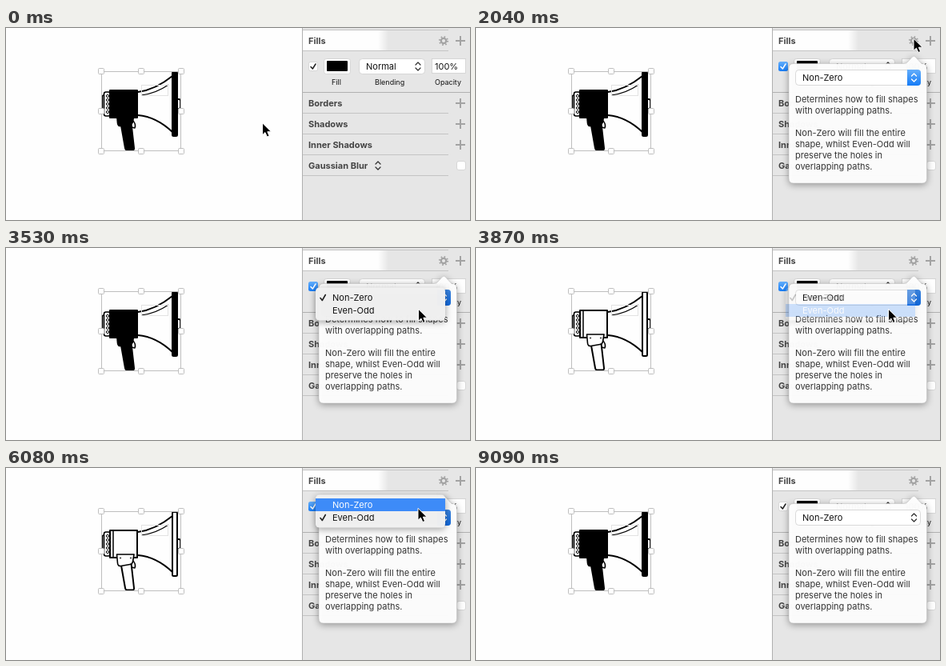
Recreate the animation shown at these times as an HTML page. Size 580 by 240 pixels, loop 9190 ms.

```html
<!DOCTYPE html>
<html lang="en">
<head>
<meta charset="utf-8">
<title>Fill rule popover</title>
<style>
html, body { margin: 0; width: 100%; height: 100%; overflow: hidden; background: #fefefe; }
svg { display: block; width: 100%; height: 100%; }
text { font: 11px Inter, "Open Sans", sans-serif; fill: #111; white-space: pre; }
.head { font-weight: 700; fill: #444; }
.small { font-size: 9px; }
.note { fill: #333; }
.line { fill: none; stroke: #c4c4c4; }
.edge { fill: none; stroke: #b0b0b0; }
.field { fill: #fff; stroke: #cbcbcb; stroke-width: .7; }
.icon { fill: none; stroke: #a3a3a3; stroke-width: 2; }
.arrows { fill: none; stroke: #333; stroke-width: 1.3; stroke-linecap: round; stroke-linejoin: round; }
.ink { fill: none; stroke: #000; stroke-width: 2; stroke-linejoin: round; }
.thin { stroke-width: 1.2; }
.shade { filter: drop-shadow(0 2px 4px rgba(0,0,0,.36)); }
</style>
</head>
<body>
<svg viewBox="0 0 580 240" id="stage">
  <defs>
    <linearGradient id="rowFade" gradientUnits="userSpaceOnUse" x1="465" x2="478" y1="0" y2="0">
      <stop stop-color="#fefefe"/><stop offset="1" stop-color="#e6e6e6"/>
    </linearGradient>
    <linearGradient id="blue" x2="0" y2="1">
      <stop stop-color="#64aefb"/><stop offset="1" stop-color="#167cf6"/>
    </linearGradient>
  </defs>

  <g id="megaphone" class="ink">
    <path d="M123 84 h-1 q-1.5 0-1.5 2 v15 q0 2 1.5 2 h1" stroke-width="1.6"/>
    <rect x="122.5" y="80" width="8" height="30" rx="2.5" stroke-width="1.6"/>
    <g id="knobs" stroke-width="1"></g>
    <path d="M165 80 Q187 77 208 60 M165 109 Q188 111 208 130"/>
    <path class="thin" d="M169 84 Q187 82 203 71"/>
    <path d="M215 89 h1 q2 0 2 2 v8 q0 2-2 2 h-1" stroke-width="1.8"/>
    <path d="M158 115 q5 5 3 10 l-4-1" stroke-width="1.5"/>
    <rect class="solid" x="130" y="78" width="34" height="34"/>
    <path d="M134 78 V112" stroke-width="1.5"/>
    <path class="solid" d="M143.5 119 L149 150 Q149.3 152.5 151.5 152.5 H158 Q160.3 152.5 160 150 L156.5 119 Z"/>
    <path class="solid" d="M138.5 108 L139.5 119 Q140 123 143.5 122.5 L155 120.5 Q158 120 158.5 117 L160 108 Z" stroke-width="1.6"/>
    <circle cx="143" cy="112.5" r=".6" stroke-width="1"/><circle cx="156" cy="112.5" r=".6" stroke-width="1"/>
    <rect class="solid" x="208" y="55" width="6" height="80" rx="1.5"/>
  </g>
  <g id="selection" stroke="#bfbfbf" fill="none">
    <rect x="169.5" y="71.5" width="33" height="13" stroke="#e2e2e2"/>
    <rect x="119.5" y="54.5" width="99" height="99"/>
  </g>

  <rect x="370" width="210" height="240" fill="#e6e6e6"/>
  <rect x="371" y="3" width="110" height="25" fill="url(#rowFade)"/>
  <path class="edge" d="M370.5 0 V240 M371 80.5 H580"/>
  <g id="panel"></g>
  <g id="gear" class="icon">
    <circle cx="547" cy="16" r="3.2" stroke-width="2.2"/>
    <circle cx="547" cy="16" r="5.1" stroke-dasharray="1.6 2.405"/>
  </g>
  <rect class="field" x="378.5" y="42.5" width="11" height="11" rx="2"/>
  <rect id="boxOn" x="378" y="42" width="12" height="12" rx="2.5" fill="url(#blue)"/>
  <path id="tick" class="arrows" d="M381 48.5 L383.3 51 L387 45" style="stroke-width:1.5"/>

  <g id="popover">
    <path class="shade" fill="#fdfdfd" fill-opacity=".975" stroke="#bbb" stroke-width=".5"
      d="M397 44.5 H535 Q538 44.5 540 42 L545.5 36 Q547.3 34.3 549 36 L554.5 42 Q556.5 44.5 558 44.5 Q563.5 45 563.5 51 V188 Q563.5 194 557.5 194 H397 Q391 194 391 188 V50.5 Q391 44.5 397 44.5 Z"/>
    <rect class="field" x="399.5" y="52.5" width="156" height="19" rx="4"/>
    <path id="stepOn" fill="url(#blue)" d="M539 52 H552 Q556 52 556 56 V68 Q556 72 552 72 H539 Z"/>
    <path id="stepDown" fill="#0a50b8" fill-opacity=".45" d="M539 52 H552 Q556 52 556 56 V68 Q556 72 552 72 H539 Z"/>
    <path id="popArrows" class="arrows" d="M544.5 60 l3-3 l3 3 M544.5 64 l3 3 l3-3"/>
    <text id="rule" x="408" y="66"></text>
    <g id="notes"></g>
  </g>

  <g id="menu">
    <rect class="shade" x="387" y="49.5" width="162" height="41" rx="4.5" fill="#f1f1f1" fill-opacity=".98"/>
    <rect id="hover" x="387" width="162" height="16" fill="#3d8bf8"/>
    <text x="408" y="66">Non-Zero</text>
    <text x="408" y="82">Even-Odd</text>
    <path id="menuTick" class="arrows" d="M393 62.5 L395.3 65.5 L399.3 58.5" style="stroke-width:1.6"/>
  </g>

  <path id="cursor" d="M1 .8 V15.8 L4.4 12.6 L6.9 18 L9.6 16.9 L7.3 11.7 H12 Z" stroke="#fff" stroke-width="1"/>
</svg>

<script>
const LOOP = 9190;
const $ = id => document.getElementById(id);

function add(parent, tag, attrs, content = '') {
  const node = document.createElementNS('http://www.w3.org/2000/svg', tag);
  for (const key in attrs) node.setAttribute(key, attrs[key]);
  node.textContent = content;
  return $(parent).appendChild(node);
}
const label = (parent, x, y, words, type = '') => add(parent, 'text', { x, y, class: type }, words);
const stepper = (x, y) => add('panel', 'path', {
  class: 'arrows', d: `M${x - 3} ${y - 2} l3-3 l3 3 M${x - 3} ${y + 2} l3 3 l3-3`
});
const field = (x, y, width, height, rx) => add('panel', 'rect', { class: 'field', x, y, width, height, rx });

// Artwork details
for (let i = 0; i < 5; i++) add('knobs', 'circle', { cx: 127, cy: 85 + i * 5, r: 1.6 });
for (const x of [119, 169, 219])
  for (const y of [54, 104, 154])
    if (x !== 169 || y !== 104)
      add('selection', 'rect', { x: x - 3.5, y: y - 3.5, width: 7, height: 7, rx: 1, fill: '#fff' });

// Inspector panel
for (const y of [2.5, 28.5, 106.5, 132.5, 158.5, 184.5])
  add('panel', 'path', { class: 'line', d: `M371 ${y} H553` });
[['Fills', 20], ['Borders', 98], ['Shadows', 124], ['Inner Shadows', 150], ['Gaussian Blur', 176]]
  .forEach(([words, y]) => label('panel', 378, y, words, 'head'));
for (const y of [16, 94, 120, 146])
  add('panel', 'path', { class: 'icon', d: `M562 ${y} h12 M568 ${y - 6} v12` });
field(397.5, 38.5, 33, 19, 3);
add('panel', 'rect', { x: 401, y: 41, width: 26, height: 13, rx: 1 });
field(441.5, 38.5, 82, 19, 4);
label('panel', 450, 52, 'Normal');
stepper(515, 48);
field(532.5, 38.5, 42, 18, 0);
label('panel', 536, 52, '100%');
label('panel', 407, 71, 'Fill', 'small');
label('panel', 461, 71, 'Blending', 'small');
label('panel', 536, 71, 'Opacity', 'small');
stepper(465, 172);
field(563.5, 166.5, 11, 11, 2.5);

[['Determines how to fill shapes', 93], ['with overlapping paths.', 107],
 ['Non-Zero will fill the entire', 135], ['shape, whilst Even-Odd will', 149],
 ['preserve the holes in', 163], ['overlapping paths.', 177]]
  .forEach(([words, y]) => label('notes', 399, y, words, 'note'));

// Cursor moves: start, end, x, y, optional bend point
const START = [319.5, 118];
const MOVES = [
  [690, 1520, 544.5, 18.5],
  [1610, 1680, 546, 12.5],
  [2370, 2610, 526, 57, 568, 38],
  [3050, 3380, 514.5, 75.5],
  [4340, 4750, 526, 59.5],
  [5730, 5900, 514, 49.5],
  [6080, 6110, 511.5, 50],
  [8070, 8350, 561, 242]
];
const MENUS = [
  { open: 2790, off: 3530, on: 3610, apply: 3690, end: 3930, dy: 0, checked: 0 },
  { open: 5400, off: 6310, on: 6390, apply: 6450, end: 6690, dy: -16, checked: 1 }
];

const progress = (t, a, b) => Math.min(1, Math.max(0, (t - a) / (b - a)));
const ease = p => p * p * (3 - 2 * p);

function cursorAt(t) {
  let [x, y] = START;
  for (const [a, b, toX, toY, bendX = (x + toX) / 2, bendY = (y + toY) / 2] of MOVES) {
    if (t < a) break;
    const p = ease(progress(t, a, b)), q = 1 - p;
    x = q * q * x + 2 * p * q * bendX + p * p * toX;
    y = q * q * y + 2 * p * q * bendY + p * p * toY;
  }
  return [x, y];
}

const show = (id, on) => $(id).setAttribute('visibility', on ? 'inherit' : 'hidden');
const rows = document.querySelectorAll('#menu text');
const solids = document.querySelectorAll('.solid');

function drawMenu(t, cursorY) {
  const menu = MENUS.find(m => t >= m.open && t < m.end);
  show('menu', menu);
  show('stepDown', menu);
  if (!menu) return;
  const row = cursorY + 1.5 - menu.dy < 70 ? 0 : 1;
  const lit = t < menu.off || t >= menu.on;
  $('menu').setAttribute('transform', `translate(0 ${menu.dy})`);
  $('menu').setAttribute('opacity', 1 - progress(t, menu.apply, menu.end));
  show('hover', lit);
  $('hover').setAttribute('y', 54 + row * 16);
  rows.forEach((text, i) => text.style.fill = lit && i === row ? '#fff' : '#111');
  $('menuTick').setAttribute('transform', `translate(0 ${menu.checked * 16})`);
  $('menuTick').style.stroke = lit && row === menu.checked ? '#fff' : '#222';
}

function render(t) {
  const [x, y] = cursorAt(t);
  const active = t >= 1890 && t < 9090;
  const evenOdd = t >= MENUS[0].apply && t < MENUS[1].apply;
  $('cursor').setAttribute('transform', `translate(${x.toFixed(2)} ${y.toFixed(2)})`);
  show('cursor', t < 8350);
  show('popover', t >= 2040);
  show('boxOn', active);
  show('stepOn', active);
  $('tick').style.stroke = active ? '#fff' : '#222';
  $('popArrows').style.stroke = active ? '#fff' : '#333';
  $('gear').style.stroke = t >= 1890 && t < 2040 ? '#6e6e6e' : '#a3a3a3';
  $('rule').textContent = evenOdd ? 'Even-Odd' : 'Non-Zero';
  solids.forEach(part => part.style.fill = evenOdd ? '#fefefe' : '#000');
  drawMenu(t, y);
}

const began = performance.now();
function tick() {
  render((performance.now() - began) % LOOP);
  requestAnimationFrame(tick);
}
tick();
</script>
</body>
</html>
```
